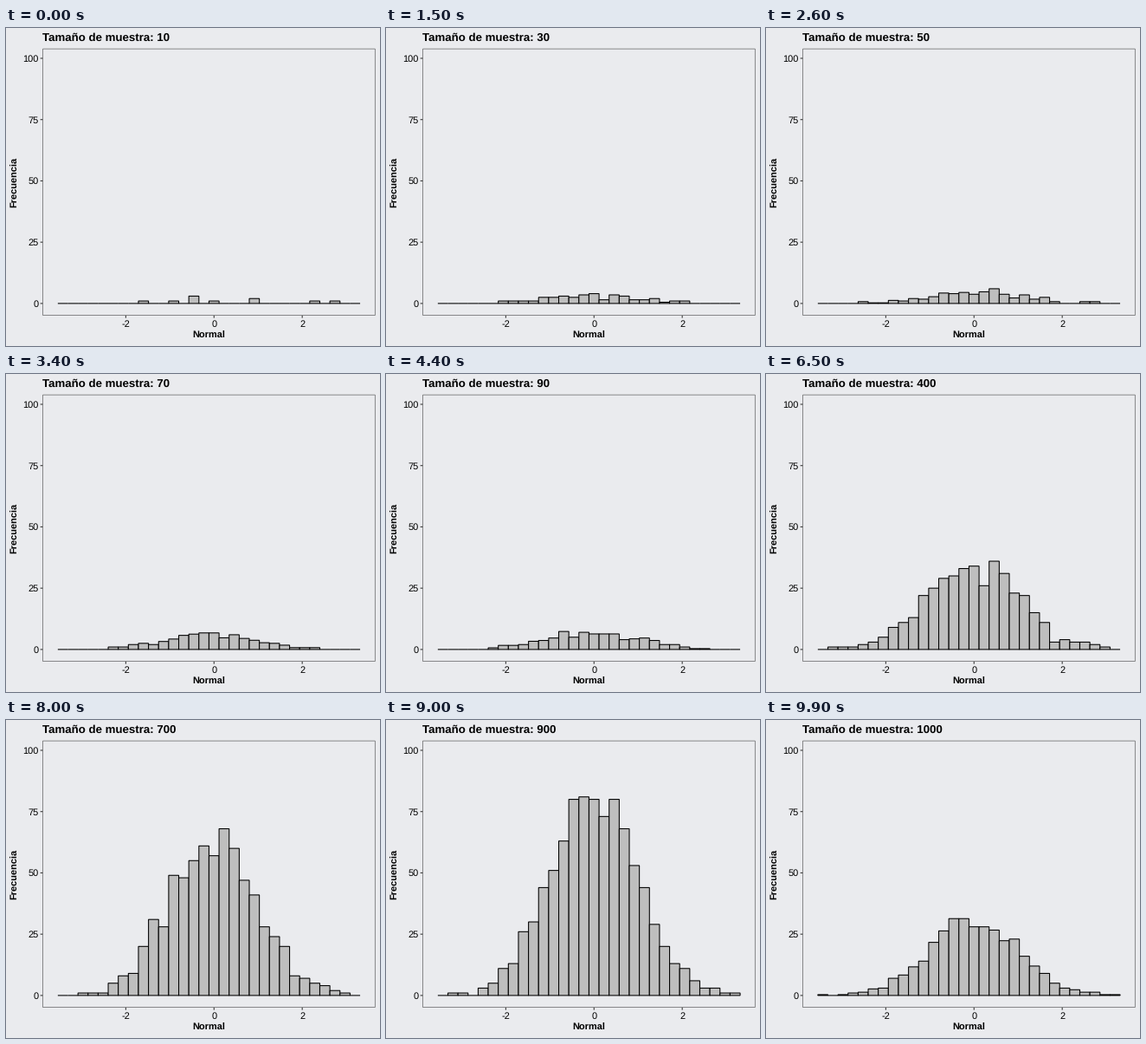
Recreate the animation shown at these times as a matplotlib script. Size 432x367 px, loop 10000 ms.

```python
import numpy as np
import matplotlib.pyplot as plt
from matplotlib.animation import FuncAnimation
from matplotlib.patches import Rectangle

W, H, DPI = 432, 367, 100
PX = 72 / DPI                      # points per pixel
BG, BAR, DARK = "#EAEBEE", "#BEBEBE", "#333333"
LEFT, RIGHT, TOP, BOTTOM = 42.4, 426.5, 23.8, 331.9
BINS, ZERO_BIN = 30, 15
BAR_W = (RIGHT - LEFT) / 1.1 / BINS
X0 = LEFT + 1.5 * BAR_W            # left edge of the first bar
Y0 = BOTTOM - (BOTTOM - TOP) / 22  # height of a count of zero
Y_UNIT = (BOTTOM - TOP) / 1.1 / 99
X_ZERO = X0 + (ZERO_BIN + 0.5) * BAR_W
X_UNIT = 50.95

SIZES = [*range(10, 100, 10), *range(100, 1001, 100)]
ARRIVE = [0, 5, *range(11, 36, 6), *range(40, 101, 5)]  # last one wraps

rng = np.random.default_rng(11)
FIRST_SAMPLE = [8, 11, 13, 13, 13, 15, 19, 19, 25, 27]  # bin of each value


def sample(n):
    """Bin counts of about n standard normal values, with mild scatter."""
    z = (np.arange(BINS) - ZERO_BIN) * BAR_W / X_UNIT
    mean = n * BAR_W / X_UNIT * np.exp(-z ** 2 / 2) / np.sqrt(2 * np.pi)
    noise = 0.6 * np.sqrt(mean) * rng.standard_normal(BINS)
    return np.maximum(0, np.rint(mean + noise))


HIST = [np.bincount(FIRST_SAMPLE, minlength=BINS), *map(sample, SIZES[1:])]

plt.rcParams["font.family"] = "Liberation Sans"
plt.rcParams["text.hinting"] = "none"
fig = plt.figure(figsize=(W / DPI, H / DPI), dpi=DPI, facecolor=BG)
ax = fig.add_axes([0, 0, 1, 1])
ax.set_xlim(0, W)
ax.set_ylim(H, 0)
ax.axis("off")


def label(x, y, text, size=11, **kw):
    return ax.text(x, y, text, fontsize=size * PX, color="black",
                   va="baseline", **kw)


def tick(xs, ys):
    ax.plot(xs, ys, color=DARK, lw=1.07 * PX, solid_capstyle="butt", snap=False)


for v in range(0, 101, 25):
    y = Y0 - v * Y_UNIT
    tick([LEFT - 2.75, LEFT], [y, y])
    label(37.4, y + 3.9, str(v), ha="right")
for v in (-2, 0, 2):
    x = X_ZERO + v * X_UNIT
    tick([x, x], [BOTTOM, BOTTOM + 2.75])
    label(x, 345, str(v), ha="center")

label((LEFT + RIGHT) / 2, 358.2, "Normal", ha="center", weight="bold")
label(13.2, (TOP + BOTTOM) / 2, "Frecuencia", ha="center", weight="bold",
      rotation=90, rotation_mode="anchor")
title = label(LEFT, 15.2, "", size=13.2, weight="bold")

bars = [ax.add_patch(Rectangle((X0 + k * BAR_W, Y0), BAR_W, 0, fc=BAR, ec="black",
                               lw=1.07 * PX, joinstyle="miter", snap=False, zorder=3))
        for k in range(BINS)]
# the panel clips the outer half of its own border
ax.add_patch(Rectangle((LEFT + 0.27, TOP + 0.27), RIGHT - LEFT - 0.54,
                       BOTTOM - TOP - 0.54, fill=False, ec=DARK, lw=0.54 * PX,
                       snap=False, zorder=4))


def update(frame):
    i = max(k for k, start in enumerate(ARRIVE) if start <= frame)
    j = (i + 1) % len(SIZES)
    steps = 4 if i < 6 else 3
    t = max(0, frame - ARRIVE[i + 1] + steps) / steps
    for bar, a, b in zip(bars, HIST[i], HIST[j]):
        bar.set_height(-((1 - t) * a + t * b) * Y_UNIT)
    shown = SIZES[j] if t > 0.5 and j > i else SIZES[i]
    title.set_text(f"Tamaño de muestra: {shown}")
    return [*bars, title]


anim = FuncAnimation(fig, update, frames=100, interval=100, repeat=True,
                     repeat_delay=0, blit=False)
plt.show()
```
